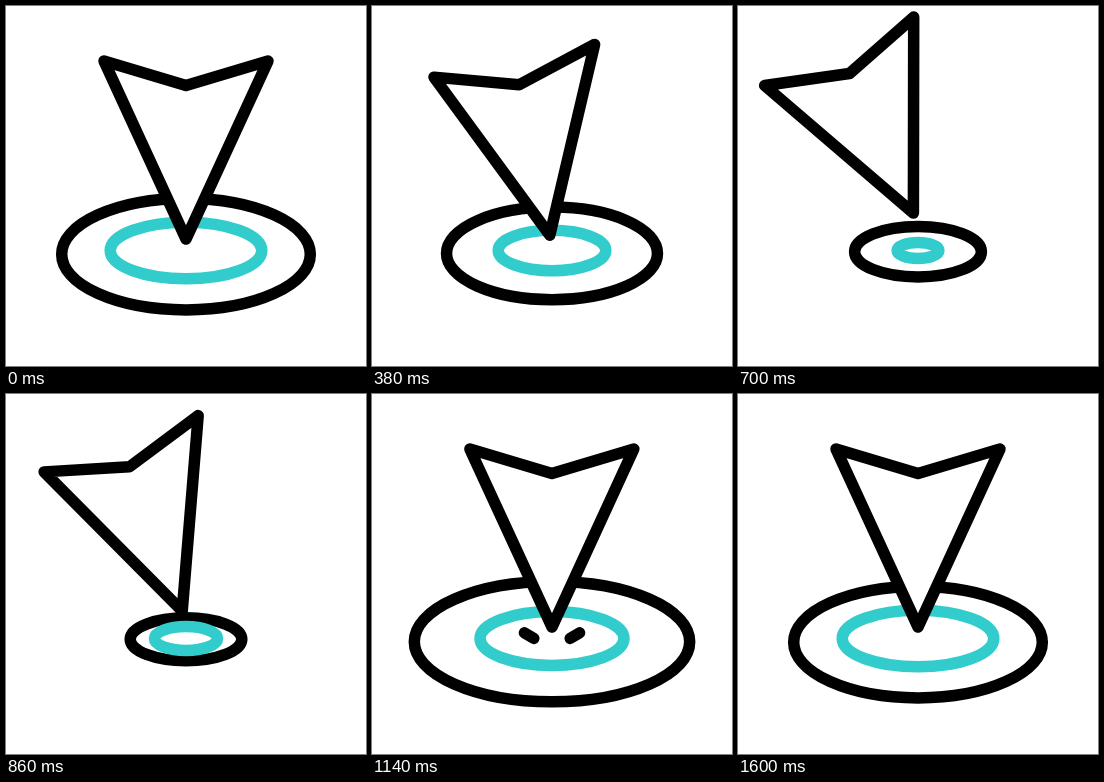
Animation, 360 px wide and 360 px high, one loop 3000 ms. Source, as an HTML page with a canvas:

```html
<!DOCTYPE html>
<html lang="en">
<head>
<meta charset="utf-8">
<title>Location pointer</title>
<style>
  html, body { margin: 0; width: 100%; height: 100%; overflow: hidden; background: #fff; }
  canvas { display: block; width: 360px; height: 360px; }
</style>
</head>
<body>
<canvas id="stage" width="360" height="360"></canvas>
<script>
const ctx = document.getElementById('stage').getContext('2d');
const LOOP = 3000, ACTIVE = 1600, STEP = 20;
const INK = '#000', TEAL = '#33cccc';

const unit = (t, from, to) => Math.min(1, Math.max(0, (t - from) / (to - from)));
const ease = (t, from, to) => Math.sin(unit(t, from, to) * Math.PI / 2) ** 2;
const easeOut = (t, from, to) => 1 - (1 - unit(t, from, to)) ** 2;

// Damped oscillation that starts at 1.
function spring(t, from) {
  const s = Math.max(0, t - from) / 1000;
  return Math.exp(-6 * s) * Math.cos(4.88 * s);
}

// Lean back, then spring upright (degrees).
const tilt = t => -26 * ease(t, 0, 820) * spring(t, 820);
// Rise, then drop onto the rings.
const lift = t => -28.5 * (ease(t, 250, 780) - ease(t, 780, 960));
// Shrink, burst past the resting size, settle.
const outerGrowth = t => -68.5 * ease(t, 120, 860) + 82 * ease(t, 860, 1125) - 13.5 * ease(t, 1125, 1380);
const innerGrowth = t => -57.5 * ease(t, 70, 800) + 53 * ease(t, 800, 980) + 4.5 * ease(t, 1060, 1380);

function ring(cy, rx, ry, color) {
  ctx.strokeStyle = color;
  ctx.beginPath();
  ctx.ellipse(180, cy, rx, ry, 0, 0, 2 * Math.PI);
  ctx.stroke();
}

function rings(t) {
  const a = outerGrowth(t), b = innerGrowth(t);
  ring(248.2 - Math.abs(a) * 0.042, 124.3 + a, 55.7 + Math.min(a * 0.5, a * 0.33), INK);
  ring(244.5, 75.8 + b, 28.3 + b * 0.37, TEAL);
}

function pointer(t) {
  ctx.save();
  ctx.translate(180, 244 + lift(t));
  ctx.rotate(tilt(t) * Math.PI / 180);
  ctx.beginPath();
  ctx.moveTo(0, -11);
  ctx.lineTo(-82, -189);
  ctx.lineTo(0, -164.5);
  ctx.lineTo(82, -189);
  ctx.closePath();
  ctx.fillStyle = '#fff';
  ctx.fill();
  ctx.strokeStyle = INK;
  ctx.stroke();
  ctx.restore();
}

function sparks(t) {
  if (t <= 1040 || t >= 1400) return;
  const head = easeOut(t, 1040, 1240), tail = easeOut(t, 1090, 1400);
  ctx.strokeStyle = INK;
  for (const side of [-1, 1]) {
    const at = k => [180 + side * (12 + 20.8 * k), 248 - 12.2 * k];
    ctx.beginPath();
    ctx.moveTo(...at(tail));
    ctx.lineTo(...at(head));
    ctx.stroke();
  }
}

function draw(t) {
  ctx.fillStyle = '#fff';
  ctx.fillRect(0, 0, 360, 360);
  ctx.lineWidth = 11.5;
  ctx.lineCap = ctx.lineJoin = 'round';
  rings(t);
  pointer(t);
  sparks(t);
}

const start = performance.now();
function tick() {
  const t = (performance.now() - start) % LOOP;
  draw(t < ACTIVE ? Math.floor(t / STEP) * STEP : 0);
  requestAnimationFrame(tick);
}
tick();
</script>
</body>
</html>
```
